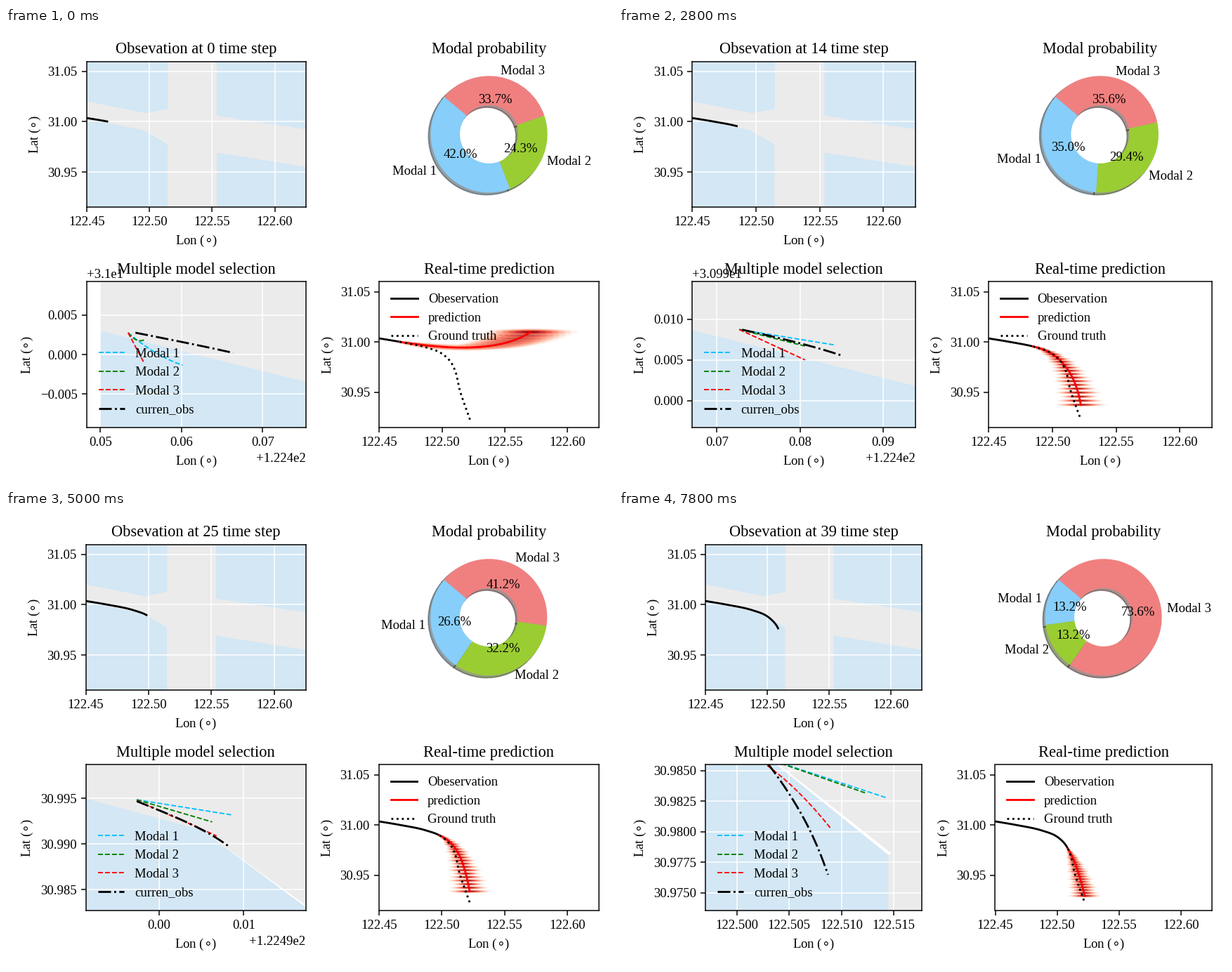
A matplotlib script for the animation above (8 s loop, 864 by 648 pixels).

```python
import numpy as np
import matplotlib.pyplot as plt
from matplotlib.animation import FuncAnimation
from matplotlib.collections import PolyCollection

plt.rcParams.update({"font.family": "Liberation Serif", "font.size": 10})

STEPS, INTERVAL = 40, 200
WINDOW, HORIZON = 9, 20
LON0, LAT0 = 122.45, 31.0
WATER, LAND = "#ebebeb", "#d3e7f5"
MODALS = ["Modal 1", "Modal 2", "Modal 3"]

# Positions are thousandths of a degree from (LON0, LAT0).
TRACK_STEP = np.array([-12, 0, 16, 25, 34, 44, 56, 75])
TRACK_LON = np.array([0.3, 16.34, 37.4, 48.3, 56.0, 60.7, 63.9, 72.3])
TRACK_LAT = np.array([3.6, 0.22, -5.3, -10.3, -18.3, -29.4, -46.7, -77.2])

# Modal 3 takes what the other two leave.
PROB_STEP = [0, 4, 10, 19, 25, 34, 39]
PROB_1 = [42.0, 49.5, 41.2, 27.3, 26.6, 16.2, 13.2]
PROB_2 = [24.3, 22.5, 26.9, 32.5, 32.2, 21.3, 13.2]


def geo(x, y):
    return LON0 + np.asarray(x) / 1000, LAT0 + np.asarray(y) / 1000


def hermite(t, x, y):
    m = np.gradient(y, x)
    i = np.clip(np.searchsorted(x, t, side="right") - 1, 0, len(x) - 2)
    h = x[i + 1] - x[i]
    u = (t - x[i]) / h
    return ((1 + 2 * u) * (1 - u) ** 2 * y[i] + u * (1 - u) ** 2 * h * m[i]
            + u * u * (3 - 2 * u) * y[i + 1] + u * u * (u - 1) * h * m[i + 1])


def track(a, b):
    t = np.arange(a, b + 0.01, 0.5)
    return hermite(t, TRACK_STEP, TRACK_LON), hermite(t, TRACK_STEP, TRACK_LAT)


def bezier(pts, t):
    t = t[:, None]
    s = 1 - t
    p0, p1, p2, p3 = pts
    return s**3 * p0 + 3 * s * s * t * p1 + 3 * s * t * t * p2 + t**3 * p3


def probabilities(k):
    p1, p2 = (np.interp(k, PROB_STEP, p) for p in (PROB_1, PROB_2))
    return [p1, p2, 100 - p1 - p2]


def model_paths(k):
    """Offsets of the three model tracks from the start of the window."""
    late = k / (STEPS - 1)
    sx = -0.45 * (1 + np.cos(np.pi * k / 24))
    sy = 0.6 * late**3
    early_bend = -0.45 * np.exp(-k / 3)
    # start lat, end lon, end lat, bend
    models = [
        (sy, 11.3 - 5.5 * np.exp(-k / 2), -1.5 - 2.6 * (k / 23 - 1) ** 2,
         early_bend),
        (sy, 9.4 - 8.3 * np.exp(-k / 9), -2.4 + 1.5 * np.exp(-k / 10),
         early_bend),
        (sy / 3, 1 + 8.4 * np.sin(np.pi * k / 49), -3.7 - 1.6 * late**6,
         0.4 * late**6)]
    u = np.linspace(0, 1, 20)
    for y0, ex, ey, bend in models:
        yield sx + (ex - sx) * u, y0 + (ey - y0) * u + 4 * bend * u * (1 - u)


def forecast(k, x, y, turning):
    """Bezier points of the predicted path and its final spread."""
    if turning:
        d = k - 19
        pts = [(x, y), (x + 20 - 0.72 * d, y - 7.2 - 0.18 * d),
               (68.5, -38 - 0.65 * d), (72.3, -64 - 0.32 * d)]
        return np.array(pts), 17.8 - 0.26 * d
    pts = [(x, y), (55 + 0.55 * k, -7.5 - 0.1 * k),
           (97, -10), (120.5 - 0.13 * k, 10 - 0.97 * k)]
    return np.array(pts), 38 - 0.8 * k


def draw_map(ax):
    shapes = [
        (WATER, [(0, 60), (175, 60), (175, -85), (0, -85)]),
        (LAND, [(0, 20.3), (47, 8.5), (64.7, 12.7), (64.7, 60), (0, 60)]),
        (LAND, [(103.7, 60), (103.7, 5.9), (175, -7.6), (175, 60)]),
        (LAND, [(103.7, -85), (103.7, -30.8), (175, -45), (175, -85)]),
        (LAND, [(0, 3), (45.1, -8.5), (64.5, -21.9), (64.5, -85), (0, -85)]),
        ("white", [(45.1, -8.5), (64.8, -21.77), (64.5, -21.9)])]
    for color, pts in shapes:
        ax.fill(*geo(*np.array(pts).T), color=color, lw=0)
    ax.grid(color="white")


def label(ax, title):
    ax.set_title(title, y=1.0)  # fixed height, even above an axis offset
    ax.set_xlabel(r"Lon ($\circ$)")
    ax.set_ylabel(r"Lat ($\circ$)")


fig, ((ax_obs, ax_pie), (ax_sel, ax_pred)) = plt.subplots(
    2, 2, figsize=(6.4, 4.8), dpi=135)

draw_map(ax_obs)
obs_line, = ax_obs.plot([], [], "k")
label(ax_obs, "")

draw_map(ax_sel)
label(ax_sel, "Multiple model selection")
modal_lines = [ax_sel.plot([], [], "--", color=c, lw=1, label=name)[0]
               for c, name in zip(["deepskyblue", "green", "red"], MODALS)]
cur_line, = ax_sel.plot([], [], "k-.", label="curren_obs")
ax_sel.legend(loc="lower left", frameon=False)

label(ax_pred, "Real-time prediction")
past_line, = ax_pred.plot([], [], "k", label="Obeservation")
pred_line, = ax_pred.plot([], [], "r", label="prediction")
true_line, = ax_pred.plot([], [], "k:", label="Ground truth")
ax_pred.legend(loc="upper left", frameon=False)

LEVELS = np.linspace(1, 0.2, 7)
shades = plt.cm.Reds(np.linspace(0.15, 1, len(LEVELS)))
shades[:, 3] = np.linspace(0.25, 0.6, len(LEVELS))
haze = PolyCollection([], facecolors=np.tile(shades, (HORIZON, 1)),
                      edgecolors="none", zorder=1)
ax_pred.add_collection(haze, autolim=False)

for ax in (ax_obs, ax_pred):
    ax.set_xlim(122.45, 122.625)
    ax.set_ylim(30.915, 31.06)


def draw_pie(probs):
    ax_pie.clear()
    ax_pie.pie(probs, labels=MODALS, autopct="%1.1f%%", shadow=True,
               startangle=140, wedgeprops={"width": 0.5},
               colors=["lightskyblue", "yellowgreen", "lightcoral"])
    ax_pie.set_title("Modal probability", y=1.0)


def draw_models(k):
    x, y = track(k - WINDOW, k)
    lon, lat = geo(x, y)
    cur_line.set_data(lon, lat)
    for line, (dx, dy) in zip(modal_lines, model_paths(k)):
        line.set_data(*geo(x[0] + dx, y[0] + dy))
    ax_sel.set_xlim(lon[0] - 0.006, lon[-1] + 0.009)
    ax_sel.set_ylim(lat[0] - 0.012, lat[-1] + 0.009)


def draw_prediction(k, turning):
    x, y = track(k, TRACK_STEP[-1])
    true_line.set_data(*geo(x, y))
    pts, spread = forecast(k, x[0], y[0], turning)
    pred_line.set_data(*geo(*bezier(pts, np.linspace(0, 1, 60)).T))

    t = np.arange(1, HORIZON + 1) / HORIZON
    wide = spread * t**0.65
    if turning:
        wide *= 1 + 0.12 * np.sin(2.1 * np.arange(HORIZON))
        tall = np.full(HORIZON, 1.8)
    else:
        tall = 1.5 + 2.3 * np.sqrt(t)
    a = np.linspace(0, 2 * np.pi, 40)
    haze.set_verts([
        np.column_stack(geo(cx + s * w * np.cos(a), cy + s * h * np.sin(a)))
        for (cx, cy), w, h in zip(bezier(pts, t), wide, tall)
        for s in LEVELS])


def update(k):
    seen = geo(*track(TRACK_STEP[0], k))
    obs_line.set_data(*seen)
    past_line.set_data(*seen)
    ax_obs.set_title(f"Obsevation at {k} time step", y=1.0)
    probs = probabilities(k)
    draw_pie(probs)
    draw_models(k)
    draw_prediction(k, turning=probs[2] > probs[0])
    fig.subplots_adjust(left=0.13, right=0.977, top=0.927, bottom=0.12,
                        wspace=0.33, hspace=0.5)
    fig.tight_layout()


anim = FuncAnimation(fig, update, frames=STEPS, interval=INTERVAL,
                     repeat=True, repeat_delay=0)
plt.show()
```
